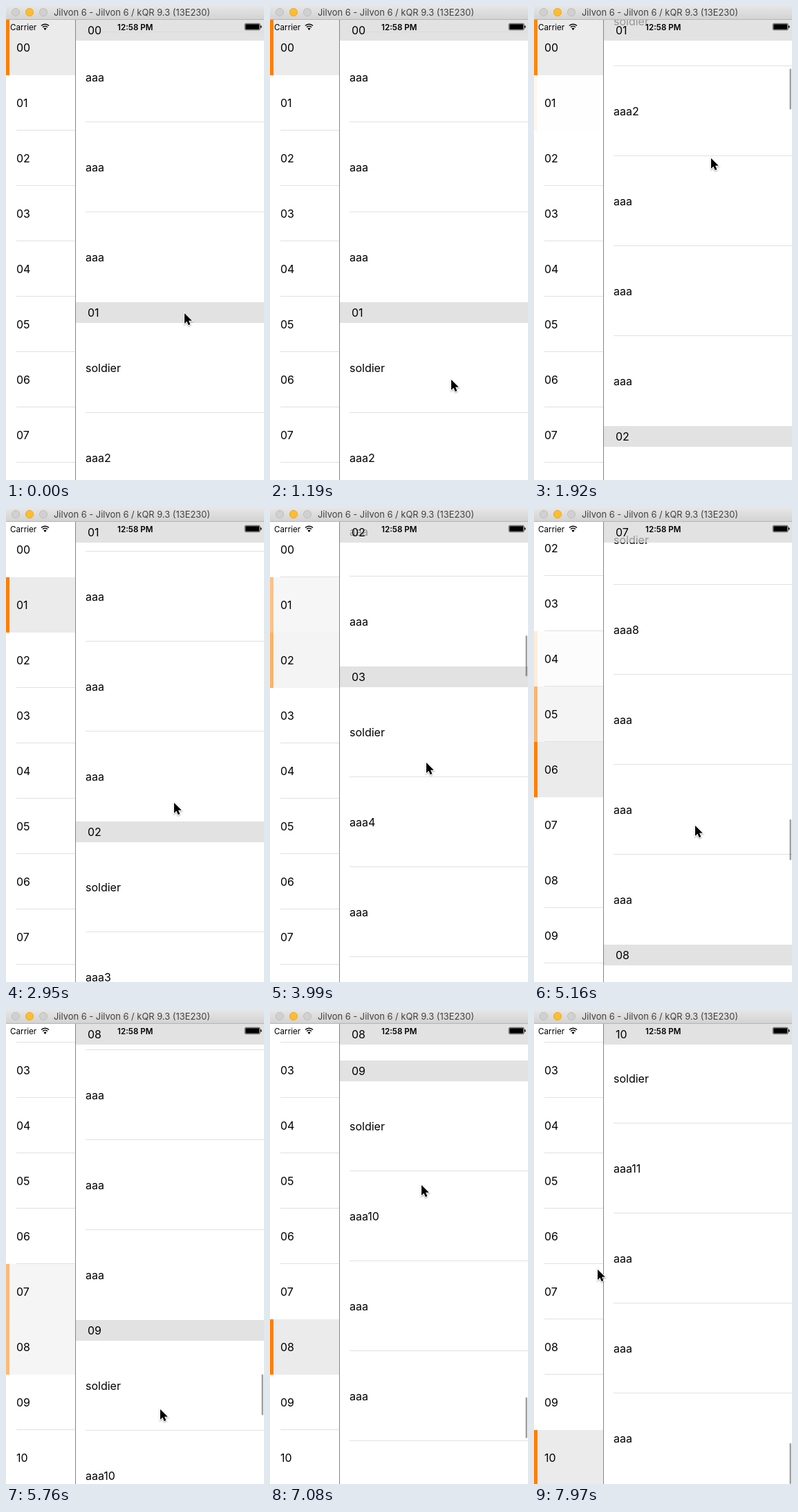
An HTML page with a canvas for the animation above (8000 ms loop, 373 by 685 pixels).

```html
<!DOCTYPE html>
<html lang="en">
<head>
<meta charset="utf-8">
<title>Linked lists</title>
<style>
  html, body { margin: 0; width: 100%; height: 100%; overflow: hidden; background: #fff; }
  canvas { display: block; width: 373px; height: 685px; }
</style>
</head>
<body>
<canvas id="stage"></canvas>
<script>
const W = 373, H = 685, TOP = 20, SPLIT = 100;
const LOOP = 8000, STEP = 147.5, FADE = 500, NAV_MOVE = 300;
const GROUPS = 11, HEADER = 30, ROW = 130, GROUP = HEADER + 5 * ROW;
const NAV_ROW = 80, VIEW = 667, NAV_MAX = GROUPS * NAV_ROW - VIEW, LIST_MAX = GROUPS * GROUP - VIEW;
const FONT = 'Inter, Roboto, sans-serif';

const canvas = document.getElementById('stage');
const ctx = canvas.getContext('2d');
const ratio = window.devicePixelRatio || 1;
canvas.width = W * ratio;
canvas.height = H * ratio;
ctx.scale(ratio, ratio);

const clamp = (v, lo, hi) => Math.min(hi, Math.max(lo, v));
const smooth = p => { p = clamp(p, 0, 1); return p * p * (3 - 2 * p); };
const label = n => String(n).padStart(2, '0');

// Decelerating scroll that is `left` away from `end` at time `at`.
const glide = (t, end, left, at, tau) => end - left * Math.exp((at - t) / tau);

function listOffset(t) {
  if (t < 1500) return 272;
  if (t < 1780) return 272 + 270 * ((t - 1500) / 280) ** 2;
  if (t <= 7080) {
    return Math.max(
      glide(t, 927, 154, 1917.5, 150),
      glide(t, 2489, 658, 3982.5, 500),
      glide(t, 6098.3, 1269.3, 5162.5, 518));
  }
  const u = t - 7080;
  return u < 420 ? 6067 + 790 * smooth(u / 420) : LIST_MAX + 44 * Math.exp((420 - u) / 173);
}

const groupAt = t => clamp(Math.floor(listOffset(t) / GROUP), 0, GROUPS - 1);

// Times at which each group becomes the selected one.
const selections = [{ t: -FADE, group: 0 }];
for (let t = 0; t < LOOP; t++) {
  const group = groupAt(t);
  if (group !== selections[selections.length - 1].group) selections.push({ t, group });
}

function navOffset(t) {
  let offset = 0;
  selections.forEach(({ t: start, group }, i) => {
    if (start > t) return;
    const next = selections[i + 1];
    const until = next ? Math.min(t, next.t) : t;
    const goal = clamp(group * NAV_ROW + NAV_ROW / 2 - VIEW / 2, 0, NAV_MAX);
    offset += (goal - offset) * smooth((until - start) / NAV_MOVE);
  });
  return Math.round(offset);
}

function highlight(group, t) {
  const i = selections.findIndex(s => s.group === group);
  if (i < 0 || selections[i].t > t) return 0;
  const next = selections[i + 1];
  return next && next.t <= t
    ? 1 - smooth((t - next.t) / FADE)
    : smooth((t - selections[i].t) / FADE);
}

const pointerKeys = [
  [0, 258, 444], [590, 248, 218], [1190, 262, 540], [1500, 261, 515], [1780, 256, 220],
  [2360, 256, 220], [3540, 230, 632], [3660, 226, 368], [3990, 226, 368], [4450, 230, 640],
  [4600, 233, 330], [5162, 233, 459], [5752, 223, 577], [6400, 222, 560], [7080, 219, 253],
  [7300, 214, 130], [7500, 190, 120], [7965, 92, 375]
];

function pointerAt(t) {
  const i = pointerKeys.findIndex(k => k[0] >= t);
  if (i <= 0) return pointerKeys[i < 0 ? pointerKeys.length - 1 : 0].slice(1);
  const [t0, x0, y0] = pointerKeys[i - 1], [t1, x1, y1] = pointerKeys[i];
  const p = smooth((t - t0) / (t1 - t0));
  return [Math.round(x0 + (x1 - x0) * p), Math.round(y0 + (y1 - y0) * p)];
}

function rect(x, y, w, h, color) {
  ctx.fillStyle = color;
  ctx.fillRect(x, y, w, h);
}

function text(str, x, baseline, size = 16, color = '#000', weight = 400) {
  ctx.font = `${weight} ${size}px ${FONT}`;
  ctx.fillStyle = color;
  ctx.fillText(str, x, baseline);
}

function pill(x, y, w, h, r, color) {
  ctx.beginPath();
  ctx.roundRect(x, y, w, h, r);
  ctx.fillStyle = color;
  ctx.fill();
}

function drawNav(t) {
  const offset = navOffset(t), selected = groupAt(t);
  for (let i = 0; i < GROUPS; i++) {
    const y = TOP + i * NAV_ROW - offset, on = highlight(i, t);
    if (on > 0) {
      rect(0, y, SPLIT, NAV_ROW, `rgba(0,0,0,${0.08 * on})`);
      rect(0, y, 5, NAV_ROW, `rgba(255,128,0,${on})`);
    }
    if (i !== selected && i !== selected - 1) rect(15, y + NAV_ROW - 1, SPLIT - 15, 1, '#e1e1e3');
    text(label(i), 15, y + 46);
  }
}

function drawHeader(group, y) {
  rect(SPLIT, y, W - SPLIT, HEADER, 'rgba(214,214,214,.7)');
  text(label(group), 118, y + 21);
}

function drawList(t) {
  const offset = Math.round(listOffset(t)), current = groupAt(t);
  const headerY = group => TOP + group * GROUP - offset;
  const last = Math.min(current + 1, GROUPS - 1);
  for (let g = current; g <= last; g++) {
    ['soldier', 'aaa' + (g + 1), 'aaa', 'aaa', 'aaa'].forEach((name, i) => {
      const y = headerY(g) + HEADER + i * ROW;
      text(name, 115, y + 71);
      if (i < 4) rect(115, y + ROW - 1, W - 115, 1, '#e1e1e3');
    });
  }
  if (last > current) drawHeader(last, headerY(last));
  drawHeader(current, Math.min(TOP, headerY(current + 1) - HEADER));
}

function drawScrollBar(t) {
  const alpha = t < 1500 ? 0 : t < 3540 ? 1 - smooth((t - 2500) / 300) : 1;
  const y = 22 + 604 * clamp(listOffset(t) / LIST_MAX, 0, 1);
  if (alpha > 0) pill(369.5, y, 2.5, 59, 1.25, `rgba(0,0,0,${0.38 * alpha})`);
}

function drawStatus() {
  text('Carrier', 6, 34.5, 11.7);
  text('12:58 PM', 161, 34.5, 11.6, '#000', 600);

  ctx.strokeStyle = '#000';
  ctx.lineWidth = 1.6;
  for (const r of [4.8, 7.8]) {
    ctx.beginPath();
    ctx.arc(56.5, 34, r, -Math.PI * 0.75, -Math.PI * 0.25);
    ctx.stroke();
  }
  ctx.beginPath();
  ctx.moveTo(56.5, 35);
  ctx.arc(56.5, 34.6, 2.9, -Math.PI * 0.75, -Math.PI * 0.25);
  ctx.fillStyle = '#000';
  ctx.fill();

  ctx.lineWidth = 0.6;
  ctx.beginPath();
  ctx.roundRect(345.3, 25.3, 22, 9.4, 1.8);
  ctx.stroke();
  pill(346.3, 26.3, 20, 7.4, 0.8, '#000');
  pill(368, 28.3, 1.5, 3.4, 0.8, '#000');
}

function drawTitleBar() {
  const shade = ctx.createLinearGradient(0, 0, 0, TOP);
  shade.addColorStop(0, '#e6e6e6');
  shade.addColorStop(1, '#d2d2d2');
  rect(0, 0, W, TOP, shade);
  rect(0, TOP - 1, W, 1, '#b4b4b4');
  [['#d0d0d0', '#b9b9b9'], ['#ffbd2e', '#e0a028'], ['#d0d0d0', '#b9b9b9']].forEach(([fill, edge], i) => {
    ctx.beginPath();
    ctx.arc(14 + 20 * i, 9, 5.6, 0, Math.PI * 2);
    ctx.fillStyle = fill;
    ctx.fill();
    ctx.strokeStyle = edge;
    ctx.lineWidth = 0.8;
    ctx.stroke();
  });
  text('Jilvon 6 - Jilvon 6 / kQR 9.3 (13E230)', 69, 14, 12.9, '#404040');
}

const arrow = new Path2D('M0 0V15L3.4 11.8L5.8 17.2L8.4 16L6.1 10.8H10.8Z');

function drawPointer(t) {
  ctx.save();
  ctx.translate(...pointerAt(t));
  ctx.shadowColor = 'rgba(0,0,0,.35)';
  ctx.shadowBlur = 2;
  ctx.shadowOffsetY = 1;
  ctx.strokeStyle = '#fff';
  ctx.lineWidth = 2;
  ctx.stroke(arrow);
  ctx.shadowColor = 'transparent';
  ctx.fillStyle = '#000';
  ctx.fill(arrow);
  ctx.restore();
}

function draw(t) {
  rect(0, 0, W, H, '#fff');
  drawNav(t);
  drawList(t);
  rect(SPLIT, TOP, 1, H - TOP, '#858585');
  drawScrollBar(t);
  drawStatus();
  drawTitleBar();
  drawPointer(t);
}

const begin = performance.now();
function tick() {
  const t = (performance.now() - begin) % LOOP;
  draw(Math.floor((t + 3) / STEP) * STEP);
  requestAnimationFrame(tick);
}
tick();
</script>
</body>
</html>
```
